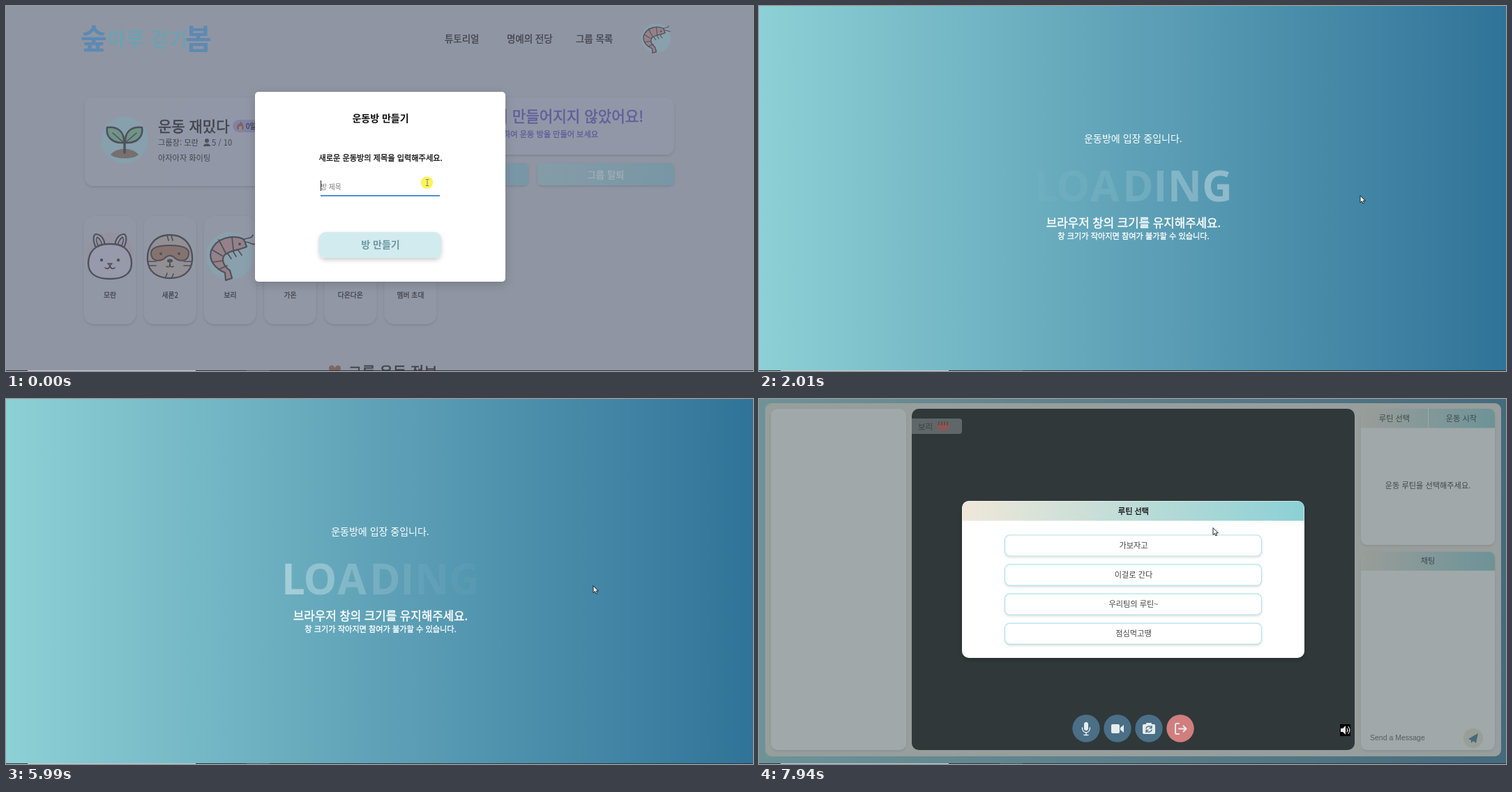
Animation of 1071 by 523 pixels, one loop 8000 ms. Source, as an HTML page:

```html
<!DOCTYPE html>
<html lang="ko">
<head>
<meta charset="utf-8">
<style>
html, body { margin: 0; width: 100%; height: 100%; overflow: hidden; background: #9095a3; }
svg { display: block; width: 1071px; height: 523px; font-family: "Noto Sans CJK KR", "Noto Sans CJK", "Noto Sans", sans-serif; }
</style>
</head>
<body>
<svg id="stage" viewBox="0 0 1071 523" xmlns="http://www.w3.org/2000/svg"></svg>
<script>
const LOOP = 8000, LOAD = 880, ROOM = 6060;

// ---- drawing helpers ----
// weight 500 is thickened with a hairline, as only regular and bold are installed
const text = (x, y, size, str, fill = '#000', weight = 400, anchor = 'start', extra = '') =>
  `<text x="${x}" y="${y}" font-size="${size}" fill="${fill}" font-weight="${weight}" text-anchor="${anchor}" ${weight === 500 ? `stroke="${fill}" stroke-width="${size * .026}"` : ''} ${extra}>${str}</text>`;
const mid = (x, y, size, str, fill, weight) => text(x, y, size, str, fill, weight, 'middle');
const rect = (x, y, x2, y2, r, fill, extra = '') =>
  `<rect x="${x}" y="${y}" width="${x2 - x}" height="${y2 - y}" rx="${r}" fill="${fill}" ${extra}/>`;
const circle = (x, y, r, fill, extra = '') => `<circle cx="${x}" cy="${y}" r="${r}" fill="${fill}" ${extra}/>`;
const oval = (x, y, rx, ry, fill, extra = '') => `<ellipse cx="${x}" cy="${y}" rx="${rx}" ry="${ry}" fill="${fill}" ${extra}/>`;
const path = (d, fill = 'none', stroke = 'none', w = 1, extra = '') =>
  `<path d="${d}" fill="${fill}" stroke="${stroke}" stroke-width="${w}" stroke-linecap="round" stroke-linejoin="round" ${extra}/>`;
const limb = (d, fill, w, edge = 3) => path(d, 'none', '#000', w + edge) + path(d, 'none', fill, w);
const at = (x, y, s, body) => `<g transform="translate(${x} ${y}) scale(${s})">${body}</g>`;
const mirror = body => body + `<g transform="scale(-1 1)">${body}</g>`;
const group = (id, body) => `<g id="${id}">${body}</g>`;
const grad = (id, a, b) =>
  `<linearGradient id="${id}"><stop stop-color="${a}"/><stop offset="1" stop-color="${b}"/></linearGradient>`;
const shadow = (id, y, blur, alpha) =>
  `<filter id="${id}" x="-20%" y="-30%" width="140%" height="170%"><feDropShadow dx="0" dy="${y}" stdDeviation="${blur}" flood-opacity="${alpha}"/></filter>`;

const defs = `<defs>${grad('sea', '#8dd0d5', '#307399')}${grad('mint', '#efe8d9', '#8bd0d5')}
  ${grad('dimBtn', '#849ca7', '#7896a5')}${grad('dimCard', '#9297a5', '#9297aa')}
  ${shadow('soft', 1.5, 1.5, .13)}${shadow('lift', 3, 3, .2)}${shadow('deep', 4, 7, .18)}</defs>`;

// ---- group page, dimmed ----
const INK = '#50525b';
const shrimp = path('M21-25C5-32-19-27-26-8C-30 6-19 18-6 23L-5 34L4 31L1 20C-9 13-11 4-7-2C0-9 14-9 25-14Z', '#948189', INK, 2.2) +
  path('M-15-24L-5-5M-25-10L-10-1M-24 8L-9 6M-14 18L-3 13M4-28L6-9', 'none', INK, 1.7) +
  path('M20-24C28-28 32-25 34-31M23-21C30-21 34-16 37-18M-2-4L3 3M5-8L10 0M13-9L18-2', 'none', INK, 1.7) +
  circle(15, -18, 2, INK);
const rabbit = mirror(path('M-20-12C-25-22-24-32-19-31C-12-30-8-23-7-14Z', '#969aaa', INK, 2.2) +
    path('M-16-13C-20-20-20-25-18-27C-14-24-12-20-11-15', '#95909c', INK, 1.6)) +
  path('M0-17C22-18 31-4 31 11C31 26 19 33 0 33C-19 33-31 26-31 11C-31-4-22-18 0-17Z', '#969aaa', INK, 2.4) +
  circle(-12, 6, 2.2, INK) + circle(12, 6, 2.2, INK) +
  path('M-3 11H3L0 14ZM0 14C-1 19-5 19-7 17M0 14C1 19 5 19 7 17', 'none', INK, 1.7);
const sloth = path('M0-30C25-30 33-10 32 6C31 23 18 32 0 32C-18 32-31 23-32 6C-33-10-25-30 0-30Z', '#929094', INK, 2.4) +
  path('M-4-29L-2-22M2-29L4-22M-31 8H-20M-30 14H-20M31 8H20M30 14H20M-6 30L-4 25M3 31L5 26', 'none', INK, 1.7) +
  path('M-27-4C-27-13-15-15 0-15C15-15 27-13 27-4C27 9 13 9 6 2C2-1-2-1-6 2C-13 9-27 9-27-4Z', '#86736f', INK, 2) +
  circle(-13, -3, 2, INK) + circle(13, -3, 2, INK) + oval(0, 7, 4, 2.6, INK) + path('M-5 15C-2 17 0 16 0 10C0 16 2 17 5 15', 'none', INK, 1.6);
const plant = path('M-20 20C-12 9 12 9 20 20C14 27-14 27-20 20Z', '#77706f') +
  path('M0 17V-3', 'none', INK, 3.4) +
  mirror(path('M-1 3C-20 4-27-8-25-19C-9-21 0-12-1 3Z', '#6f9488', INK, 2.6) + path('M-17-11L-2 2', 'none', INK, 1.6));

const members = ['모란', '새론2', '보리', '가온', '다온다온', '멤버 초대'].map((name, i) => {
  const x = 149 + i * 86.2;
  return rect(x - 37.5, 301, x + 37.3, 456, 15, '#9297a5', 'filter="url(#soft)"') + mid(x, 418, 9.8, name, '#43464f', 500);
}).join('');

const page = rect(0, 0, 1071, 523, 0, '#9095a3') +
  text(107, 62, 41, '숲', '#5c8ab2', 900) + text(145, 59, 29, '마루 걷기', '#70a0b0', 700) + text(257, 62, 41, '봄', '#5c8ab2', 900) +
  text(629, 52, 13.44, '튜토리얼', '#43464f', 500) + text(718, 52, 13.44, '명예의 전당', '#43464f', 500) + text(817, 52, 13.44, '그룹 목록', '#43464f', 500) +
  circle(932, 46, 21, '#89a0ad') + at(930, 47, .6, shrimp) +
  rect(113, 131, 560, 258, 12, 'url(#dimCard)', 'filter="url(#soft)"') +
  circle(170, 192, 33.5, '#87a0ad') + at(170, 193, 1, plant) +
  text(218, 180, 21, '운동 재밌다', '#43464f', 500) +
  rect(325, 163, 390, 181, 9, '#8083a3') +
  path('M336 165C341 170 341 173 340 177H332C329 172 333 171 334 168C335 169 336 168 336 165Z', '#806263') + oval(336, 175, 2.2, 3, '#a08a70') +
  text(344, 176, 10, '0일', '#43464f', 500) +
  text(218, 200, 11.2, '그룹장: 모란', '#43464f') + circle(288, 193, 3, INK) + path('M283 201C283 196 293 196 293 201Z', INK) +
  text(295, 200, 11.2, '5 / 10', '#43464f') + text(218, 222, 11.2, '아자아자 화이팅', '#43464f') +
  rect(580, 131, 958, 213, 12, '#9297a7', 'filter="url(#soft)"') +
  text(914, 166, 21.2, '운동 방이 만들어지지 않았어요!', '#625f9b', 500, 'end') +
  text(849, 188, 11.2, '클릭하여 운동 방을 만들어 보세요', '#625f9b', 500, 'end') +
  rect(560, 225, 749, 257, 7, 'url(#dimBtn)', 'filter="url(#soft)"') + rect(762, 225, 958, 257, 7, 'url(#dimBtn)', 'filter="url(#soft)"') +
  mid(860, 247, 13.44, '그룹 탈퇴', '#a3adb8', 500) +
  members + circle(149, 358, 34, '#95929f') + at(149, 358, 1, rabbit) +
  circle(235, 358, 34, '#8d9ca5') + at(235, 358, 1, sloth) + circle(321, 358, 34, '#89a0ad') + at(320, 359, 1, shrimp) +
  circle(467, 519, 4, '#7d685f') + circle(476, 519, 4, '#7d685f') + oval(471, 526, 9, 8, '#7d685f') +
  text(491, 532, 21, '그룹 운동 정보', '#43464f', 500);

const form = rect(357, 123, 716, 395, 5, '#fff', 'filter="url(#deep)"') +
  mid(537, 166, 14, '운동방 만들기', '#111', 700) + mid(537, 222, 11.2, '새로운 운동방의 제목을 입력해주세요.', '#111', 500) +
  text(451, 263, 9.8, '방 제목', '#777') + rect(451, 250, 452, 265, 0, '#222', 'id="caret"') +
  rect(451, 271, 622, 272.6, 0, '#2a74d8') +
  rect(449, 324, 624, 361, 9, '#d2ebef', 'filter="url(#lift)"') + mid(537, 347, 14, '방 만들기', '#6b979f', 700);

// ---- loading ----
const letterX = [412, 450.5, 496, 543.5, 575.5, 610.5, 657];
const loading = rect(0, 0, 1071, 523, 0, 'url(#sea)') +
  mid(536.5, 195, 14, '운동방에 입장 중입니다.', '#fff') +
  [...'LOADING'].map((c, i) => text(letterX[i], 280, 60, c, '#fff', 700, 'middle', 'class="letter" font-family="Open Sans, Noto Sans, sans-serif"')).join('') +
  mid(537, 317, 16.8, '브라우저 창의 크기를 유지해주세요.', '#fff', 500) +
  mid(537, 334, 11.2, '창 크기가 작아지면 참여가 불가할 수 있습니다.', '#fff', 500);

// ---- room ----
const room = rect(0, 0, 1071, 523, 0, 'url(#sea)') + rect(9, 6, 1064, 512, 9, '#ece8df') +
  rect(17, 14, 211, 503, 10, '#fff', 'filter="url(#soft)"') + rect(219, 14, 854, 503, 10, '#000') +
  path('M219 28H287Q291 28 291 32V46Q291 50 287 50H219Z', '#6b6b6b') + text(228, 44, 11.5, '보리', '#111') +
  rect(256, 34, 272, 45, 2, '#d0483c') + path('M258 33V37M262 33V37M266 33V37M270 33V37', 'none', '#5c1712', 1.5) +
  rect(863, 14, 1055, 209, 9, '#fff', 'filter="url(#soft)"') +
  path('M863 42V23Q863 14 872 14H1046Q1055 14 1055 23V42Z', 'url(#mint)') + path('M959.5 14V42M863 42H1055', 'none', '#fff', 1) +
  mid(911, 32, 11.2, '루틴 선택', '#222') + mid(1007, 32, 11.2, '운동 시작', '#222') +
  mid(959, 128, 11.2, '운동 루틴을 선택해주세요.', '#222') +
  rect(863, 219, 1055, 503, 9, '#fff', 'filter="url(#soft)"') +
  path('M863 246V228Q863 219 872 219H1046Q1055 219 1055 228V246Z', 'url(#mint)') + mid(959, 236, 11.2, '채팅', '#222') +
  text(876, 489, 10.5, 'Send a Message', '#555', 400, 'start', 'font-family="Liberation Sans, Arial, sans-serif"') +
  circle(1024, 486, 14, '#efe8d4') + path('M1017 487L1031 479L1028 493L1024 490L1021 493V489Z', '#2f7398');

const W = '#e6ecee';
const controls = [469, 514, 559].map(x => circle(x, 472, 19.7, '#4a6f86')).join('') + circle(604, 472, 19.7, '#d27d7e') +
  rect(466, 463, 472, 475, 3, W) + path('M463.5 471C463.5 480 474.5 480 474.5 471M469 478V481M466 481.5H472', 'none', W, 1.5) +
  rect(505, 466, 517, 479, 2, W) + path('M518 471L523 467V478L518 474Z', W) +
  rect(550, 466, 568, 480, 2, W) + rect(555, 464, 563, 468, 1, W) +
  path('M555 472C556 468 562 468 563 471M563 474C562 478 556 478 555 475M563 468.5V471.5H560M555 477.5V474.5H558', 'none', '#4a6f86', 1.3) +
  path('M602 465H599Q597 465 597 467V478Q597 480 599 480H602M602 472.5H612M608.5 468.5L612.5 472.5L608.5 476.5', 'none', W, 2) +
  rect(833, 466, 848, 483, 0, '#000') + path('M834 472H837L841 468V481L837 477H834Z', W) +
  path('M843 472Q844.5 474.5 843 477M845 469.5Q848.5 474.5 845 479.5', 'none', W, 1.2);

// the figure is symmetric about x = 0 and is placed on the screen afterwards
const BLUE = '#3f90bd', SKIN = '#f8cdae';
const man = mirror(limb('M-8 247L-15 266', SKIN, 7.5) + path('M-18 265L-9 268V273.5H-27C-27 269-22 269-18 265Z', '#fff', '#000', 2.4)) +
  mirror(limb('M-17 216L-21 209L-9 199', SKIN, 6.5) + circle(-8, 199, 4, SKIN, 'stroke="#000" stroke-width="2"')) +
  path('M-20 214L-11 219H11L20 214L22 221L13 229V236H-13V229L-22 221Z', '#4c86ec', '#000', 2.4) +
  path('M-12 233H12L15 250H3L0 243L-3 250H-15Z', '#f6b118', '#000', 2.4) +
  circle(0, 215, 6.8, '#c08a60', 'stroke="#000" stroke-width="2"') + path('M-7 213C-7 205 7 205 7 213Z', '#e9b92e', '#000', 2);
const thumbs = [176, 207, 238].map(y => rect(377, y + .5, 423, y + 25, 0, '#fff', 'stroke="#4d93c4" stroke-width="1.3"')).join('') +
  limb('M392 194H397L400 190H406L408 194', '#c98d60', 2.2, 1.5) + limb('M400 190L398 185', '#f0a030', 3, 1.5) + circle(397, 182, 2.2, '#222') +
  limb('M399.5 216V222', '#3d7fc0', 6, 1.5) + limb('M398 223V227M401 223V227', '#7a8fa8', 1.5, 1.2) + circle(399.5, 212, 2.5, '#222') +
  limb('M392 258L400 251L406 253V258', '#c98d60', 2.2, 1.5) + limb('M400 251L403 247L396 249', '#f0a030', 2.5, 1.5) + circle(405, 244, 2.2, '#222');
const sofa = rect(478, 205, 556, 232, 8, '#737373') + path('M483 213L550 222M483 222L550 212', 'none', '#666', 1) +
  rect(480, 226, 556, 240, 4, '#a9a9a9') + path('M480 233H556', 'none', '#858585', 1) + rect(471, 217, 486, 241, 6, '#919191') +
  path('M483 241L482 245M548 241V245', 'none', '#555', 2.4);
const webcam = path('M531 139Q536.5 136 542 139M533 142Q536.5 140 540 142', 'none', '#000', 1.5) +
  rect(512.5, 143, 560.5, 156, 6, '#4c4b50', 'stroke="#000" stroke-width="2"') + circle(536.5, 149.5, 6, '#77757c', 'stroke="#000" stroke-width="2"') +
  circle(536.5, 149.5, 2, '#222') + path('M518 149.5H520M553 149.5H555', 'none', '#aaa', 1.5) +
  rect(532, 157, 541, 164, 1, '#77757c', 'stroke="#000" stroke-width="2"') + rect(527, 163, 546, 169, 2, '#908e96', 'stroke="#000" stroke-width="2"');
const monitor = rect(358, 164, 715, 319, 17, '#000') + rect(370, 172, 703, 291, 0, '#fff', 'stroke="#3c86b9" stroke-width="2.4"') +
  rect(371, 173, 427, 290, 0, '#f7f5ec') + path('M371.5 173V290', 'none', '#7cc4c8', 2.4) + path('M428 172V291', 'none', '#3c79a8', 2.4) +
  path('M370 298H704V306Q704 313 697 313H377Q370 313 370 306Z', '#d9d7df') + rect(525, 301.5, 548, 308.5, 3.5, '#000') +
  path('M498 319H576L582 331H491Z', '#58565f', '#000', 2) + rect(462, 330, 611, 348, 5, '#000') + rect(473, 337, 600, 341, 1, '#d9d7df') +
  thumbs + sofa + oval(566, 267, 63, 16, 'none', `stroke="${BLUE}" stroke-width="3.4" stroke-dasharray="4 4"`) +
  path('M503 267V232C503 198 533 182 566 182C599 182 629 198 629 232V267', 'none', BLUE, 3.6, 'stroke-dasharray="10 7" style="stroke-linecap:butt"') + at(565.5, 0, 1, man) + webcam;
const guide = rect(213, 47, 860, 470, 5, '#fff') +
  mid(536.5, 117, 25.2, '운동방에 입장하셨습니다.', BLUE, 500) + mid(838, 74, 11, 'X', '#555') + monitor +
  rect(230, 375, 843, 419, 5, '#d2ebee') + mid(536.5, 403, 16.8, '그림과 같이 전신이 잘 보이도록 서주세요', '#111', 500);

const picker = rect(291, 146, 782, 371, 10, '#fff', 'filter="url(#lift)"') +
  path('M291.5 174.5V156Q291.5 146.5 301 146.5H772Q781.5 146.5 781.5 156V174.5Z', 'url(#mint)') + mid(537, 165, 11.2, '루틴 선택', '#111', 500) +
  ['가보자고', '이걸로 간다', '우리팀의 루틴~', '점심먹고땡'].map((s, i) => {
    const y = 195 + i * 42.1;
    return rect(352.5, y, 720.5, y + 30, 7, '#fff', 'stroke="#b3e1e7" stroke-width="1.2" filter="url(#soft)"') + mid(537, y + 19, 11.2, s, '#444');
  }).join('');

const taskbar = rect(0, 522, 1071, 523, 0, '#2d3138') + rect(31, 522, 272, 523, 0, '#c3cace') + rect(345, 522, 378, 523, 0, '#4b5258');

const pointers = circle(-.5, 0, 8.7, '#fbf45a', 'id="ring" style="mix-blend-mode:multiply"') +
  group('arrow', path('M0 0V9.6L2.3 7.6L3.9 11L5.6 10.2L4.1 7H7Z', '#fff', '#222', 1)) +
  group('hand', path('M1 .5Q2-.5 3 .5V4.5L7 5.5Q8 6 8 7.5L7 11.5H1.5L-1.5 7.5Q-1.5 6 0 6.5L1 7.5Z', '#fff', '#222', 1)) +
  group('beam', path('M-2-4.5H2M0-4.5V4.5M-2 4.5H2', 'none', '#85856a', 1));

const stage = document.getElementById('stage');
stage.innerHTML = defs + group('page', page + form) + group('loading', loading) +
  group('room', room + rect(0, 0, 1071, 523, 0, '#566468', 'id="mist"') + rect(0, 0, 1071, 523, 0, '#000', 'id="shade"') +
    group('controls', controls) + group('guide', guide) + group('picker', picker)) +
  taskbar + group('pointer', pointers);

// ---- motion ----
const $ = id => document.getElementById(id);
const show = (id, on) => $(id).setAttribute('display', on ? 'inline' : 'none');
const fade = (id, o) => { show(id, o > 0); $(id).setAttribute('opacity', o); };
const ramp = (t, a, b) => Math.min(1, Math.max(0, (t - a) / (b - a)));
const smooth = p => p * p * (3 - 2 * p);
const letters = [...document.querySelectorAll('.letter')];

// CSS "ease": cubic-bezier(.25, .1, .25, 1)
function ease(x) {
  const curve = (s, a, b) => 3 * a * s * (1 - s) ** 2 + 3 * b * s * s * (1 - s) + s ** 3;
  let lo = 0, hi = 1;
  for (let i = 0; i < 18; i++) {
    const m = (lo + hi) / 2;
    if (curve(m, .25, .25) < x) lo = m; else hi = m;
  }
  return curve(lo, .1, 1);
}

const track = [
  [0, 604, 253], [200, 604, 253], [620, 600, 336], [1030, 600, 336], [1780, 856, 272], [2010, 862, 272],
  [3580, 862, 272], [4260, 851, 287], [5020, 851, 287], [5090, 842, 268], [6440, 842, 268],
  [6600, 839, 84], [6740, 839, 72], [7130, 839, 72], [7370, 911, 28], [7560, 911, 28], [7880, 698, 157], [7940, 651, 185], [8000, 651, 185]
];
function pointerAt(t) {
  const i = track.findIndex(k => k[0] > t), a = track[i - 1], b = track[i];
  const p = smooth(ramp(t, a[0], b[0]));
  return [a[1] + (b[1] - a[1]) * p, a[2] + (b[2] - a[2]) * p];
}
const within = (t, ...spans) => spans.some(([a, b]) => t >= a && t < b);

function draw(t) {
  show('page', t < LOAD);
  show('loading', t >= LOAD && t < ROOM);
  show('room', t >= ROOM);
  show('caret', t < 500);

  letters.forEach((el, i) => {
    const phase = Math.max(0, t - LOAD - i * 100) / 1400 % 2;
    el.setAttribute('opacity', 1 - ease(phase < 1 ? phase : 2 - phase));
  });

  const dark = ramp(t, ROOM - 60, ROOM + 70) * (1 - ramp(t, 7080, 7280));
  const pick = smooth(ramp(t, 7470, 7680));
  fade('shade', .6 * dark);
  fade('guide', dark);
  fade('mist', .56 * pick);
  fade('picker', pick);
  fade('controls', 1 - .5 * dark);

  const [x, y] = pointerAt(t);
  $('pointer').setAttribute('transform', `translate(${x} ${y})`);
  const beam = within(t, [0, 420], [LOAD, 1100]);
  const hand = within(t, [420, LOAD], [6720, 7130], [7350, 7500]);
  show('beam', beam);
  show('hand', hand);
  show('arrow', !beam && !hand);
  show('ring', within(t, [0, 140], [720, 840], [6940, 7090], [7390, 7470]));
}

const start = performance.now();
function tick() {
  draw((performance.now() - start) % LOOP);
  requestAnimationFrame(tick);
}
tick();
</script>
</body>
</html>
```
